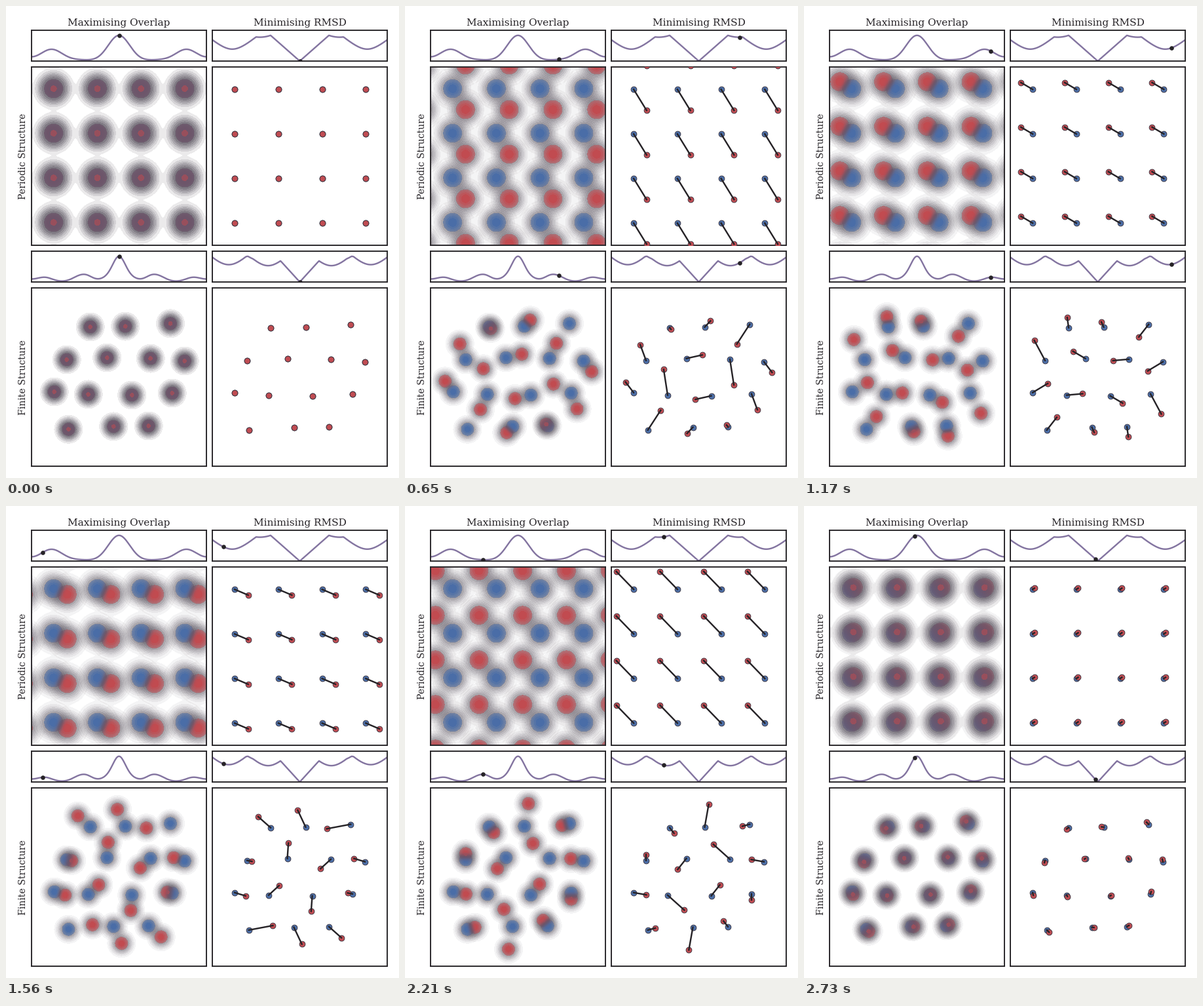
These frames come from a looping animation (600x720 px, 2.86 s). A matplotlib script:

```python
import numpy as np
import matplotlib.pyplot as plt
from matplotlib.animation import FuncAnimation

W, H, DPI = 600, 720, 100
PX = 72 / DPI
FRAMES, INTERVAL, STEP = 22, 130, 0.047

INK, PURPLE, BLUE, RED = "#262327", "#8374a0", "#4c6fa8", "#c04c52"
BLUE_RGB, RED_RGB = np.array([74, 110, 168]), np.array([194, 75, 80])
RIM_RGB = np.array([85, 78, 90])

CELL = np.array([66.75, 68.0])
DRIFT = CELL * [-3, 2]          # lattice translation over one loop
SIGMA_LATTICE, SIGMA_CLUSTER = 10.6, 7.3

HALF = np.array([(-44.5, -75.5), (9, -76.4), (77.8, -80.7), (-80.5, -25.5),
                 (-19, -28.5), (47.5, -27.4), (99.5, -23.5)])
CLUSTER = np.vstack([HALF, -HALF])
LATTICE = np.array([(i, j) for j in range(-1, 5) for i in range(-1, 5)]) * CELL

LATTICE_AT = {"left": (72.7, 126.1), "right": (349.1, 127.2)}
CLUSTER_AT = {"left": (173.2, 565.0), "right": (448.5, 566.2)}


def lattice_shift(t):
    d = t * DRIFT
    return d - CELL * np.round(d / CELL)


def rotated(t):
    c, s = np.cos(np.pi * t), np.sin(np.pi * t)
    return CLUSTER @ np.array([[c, s], [-s, c]])


def squared_distances(a, b):
    return ((a[:, None] - b[None]) ** 2).sum(-1)


def assign(cost):
    """Hungarian algorithm: the best column for every row."""
    n = len(cost)
    u, v = np.zeros(n + 1), np.zeros(n + 1)
    match = np.zeros(n + 1, int)
    for row in range(1, n + 1):
        match[0], col = row, 0
        best, back = np.full(n + 1, np.inf), np.zeros(n + 1, int)
        used = np.zeros(n + 1, bool)
        while True:
            used[col] = True
            r = match[col]
            slack = np.append(np.inf, cost[r - 1] - u[r] - v[1:])
            closer = ~used & (slack < best)
            best[closer], back[closer] = slack[closer], col
            nxt = int(np.argmin(np.where(used, np.inf, best)))
            delta = best[nxt]
            u[match[used]] += delta
            v[used] -= delta
            best[~used] -= delta
            col = nxt
            if match[col] == 0:
                break
        while col:
            match[col] = match[back[col]]
            col = back[col]
    cols = np.empty(n, int)
    cols[match[1:] - 1] = np.arange(n)
    return cols


def lattice_overlap(t):
    d2 = ((lattice_shift(t) + LATTICE - 2 * CELL) ** 2).sum(-1)
    return np.exp(-d2 / (4 * SIGMA_LATTICE ** 2)).sum()


def lattice_rmsd(t):
    return np.hypot(*lattice_shift(t))


def cluster_overlap(t):
    d2 = squared_distances(CLUSTER, rotated(t))
    return np.exp(-d2 / (4 * SIGMA_CLUSTER ** 2)).sum()


def cluster_rmsd(t):
    d2 = squared_distances(CLUSTER, rotated(t))
    return np.sqrt(d2[np.arange(len(d2)), assign(d2)].mean())


def density(points, sigma, box):
    x0, y0, x1, y1 = box
    gx = np.exp(-(np.arange(x0, x1) + 0.5 - points[:, :1]) ** 2 / (2 * sigma ** 2))
    gy = np.exp(-(np.arange(y0, y1) + 0.5 - points[:, 1:]) ** 2 / (2 * sigma ** 2))
    return gy.T @ gx


def banded(f, levels, values):
    return np.append(0, values)[np.digitize(f, levels)]


def rim_alpha(f):
    return banded(f, [.011, .03, .06, .1, .16, .25, .36],
                  [.06, .13, .20, .29, .38, .48, .57])


def core_alpha(f):
    return banded(f, [.4, .52, .66, .82], [.55, .7, .85, 1])


def over(a, b):
    return (1 - (1 - a) * (1 - b))[..., None]


def shade(blue, red):
    """Grey contour rims with coloured cores, red lying over blue."""
    rim_b, rim_r = rim_alpha(blue), rim_alpha(red)
    weight = (red ** 2.5 + 1e-9) / (red ** 2.5 + blue ** 2.5 + 2e-9)
    weight = np.maximum(weight, banded(red, [.9], [.85]))
    tint = BLUE_RGB + weight[..., None] * (RED_RGB - BLUE_RGB)
    contested = 4 * weight * (1 - weight) * np.minimum(rim_b, rim_r)
    tint = tint + 0.9 * contested[..., None] * (RIM_RGB - tint)
    base = 255 + over(rim_b, rim_r) * (RIM_RGB - 255)
    core = over(core_alpha(blue), core_alpha(red))
    return np.clip(base + core * (tint - base), 0, 255).astype(np.uint8)


fig = plt.figure(figsize=(W / DPI, H / DPI), dpi=DPI, facecolor="white")


def panel(box):
    x0, y0, x1, y1 = box
    ax = fig.add_axes([x0 / W, 1 - y1 / H, (x1 - x0) / W, (y1 - y0) / H])
    ax.set(xlim=(x0, x1), ylim=(y1, y0), xticks=[], yticks=[])
    for spine in ax.spines.values():
        spine.set(linewidth=1.9 * PX, edgecolor=INK)
    return ax


class Curve:
    def __init__(self, box, func):
        self.x0, self.y0, self.x1, self.y1 = box
        self.func = func
        ts = np.linspace(-0.5, 0.5, 268)
        values = np.array([func(t) for t in ts])
        self.top = values.max()
        ax = panel(box)
        ax.plot(*self.place(ts, values), color=PURPLE, lw=2.4 * PX)
        self.dot, = ax.plot([], [], "o", color=INK, ms=6.6 * PX, mew=0, zorder=5)

    def place(self, t, value):
        height = (self.y1 - self.y0) / 1.2
        return (self.x0 + (t + 0.5) * (self.x1 - self.x0),
                self.y1 - height * value / self.top)

    def update(self, t):
        x, y = self.place(t, self.func(t))
        self.dot.set_data([x], [y])


class Cloud:
    def __init__(self, box, origin, sigma, points, moved):
        self.box, self.origin, self.sigma, self.moved = box, origin, sigma, moved
        x0, y0, x1, y1 = box
        self.still = density(points + origin, sigma, box)
        self.image = panel(box).imshow(
            np.full((y1 - y0, x1 - x0, 3), 255, np.uint8),
            extent=(x0, x1, y1, y0), aspect="auto", interpolation="nearest")

    def update(self, t):
        red = density(self.moved(t) + self.origin, self.sigma, self.box)
        self.image.set_data(shade(self.still, red))


class Links:
    def __init__(self, box, origin, points, moved, pair):
        self.points, self.origin = points + origin, origin
        self.moved, self.pair = moved, pair
        ax = panel(box)
        style = dict(ms=8.8 * PX, mew=0.9 * PX, mec="#3a3440")
        ax.plot(*self.points.T, "o", color=BLUE, zorder=2, **style)
        self.red, = ax.plot([], [], "o", color=RED, zorder=3, **style)
        self.lines, = ax.plot([], [], color=INK, lw=2.4 * PX, zorder=4)

    def update(self, t):
        red = self.moved(t) + self.origin
        self.red.set_data(*red.T)
        if self.pair:
            red = red[assign(squared_distances(self.points, red))]
        gap = np.full_like(red, np.nan)
        path = np.stack([self.points, red, gap], axis=1).reshape(-1, 2)
        self.lines.set_data(*path.T)


def moved_lattice(t):
    return LATTICE + lattice_shift(t)


LEFT, RIGHT = (39, 306), (315, 582)


def box(columns, top, bottom):
    return columns[0], top, columns[1], bottom


parts = [
    Curve(box(LEFT, 37, 84), lattice_overlap),
    Curve(box(RIGHT, 37, 84), lattice_rmsd),
    Curve(box(LEFT, 374, 421), cluster_overlap),
    Curve(box(RIGHT, 374, 421), cluster_rmsd),
    Cloud(box(LEFT, 93, 365), LATTICE_AT["left"], SIGMA_LATTICE, LATTICE, moved_lattice),
    Links(box(RIGHT, 93, 365), LATTICE_AT["right"], LATTICE, moved_lattice, False),
    Cloud(box(LEFT, 430, 702), CLUSTER_AT["left"], SIGMA_CLUSTER, CLUSTER, rotated),
    Links(box(RIGHT, 430, 702), CLUSTER_AT["right"], CLUSTER, rotated, True),
]


def label(x, y, text, size, rotation=0):
    fig.text(x / W, 1 - y / H, text, family="DejaVu Serif", size=size * PX,
             color=INK, ha="center", va="baseline", rotation=rotation,
             rotation_mode="anchor")


label(172, 30, "Maximising Overlap", 15.4)
label(449, 30, "Minimising RMSD", 15.4)
label(30.5, 229, "Periodic Structure", 14, 90)
label(30.5, 566.5, "Finite Structure", 14, 90)


def draw(k):
    t = (k * STEP + 0.5) % 1 - 0.5
    for part in parts:
        part.update(t)


anim = FuncAnimation(fig, draw, frames=FRAMES, interval=INTERVAL,
                     repeat=True, repeat_delay=0, blit=False)
plt.show()
```
